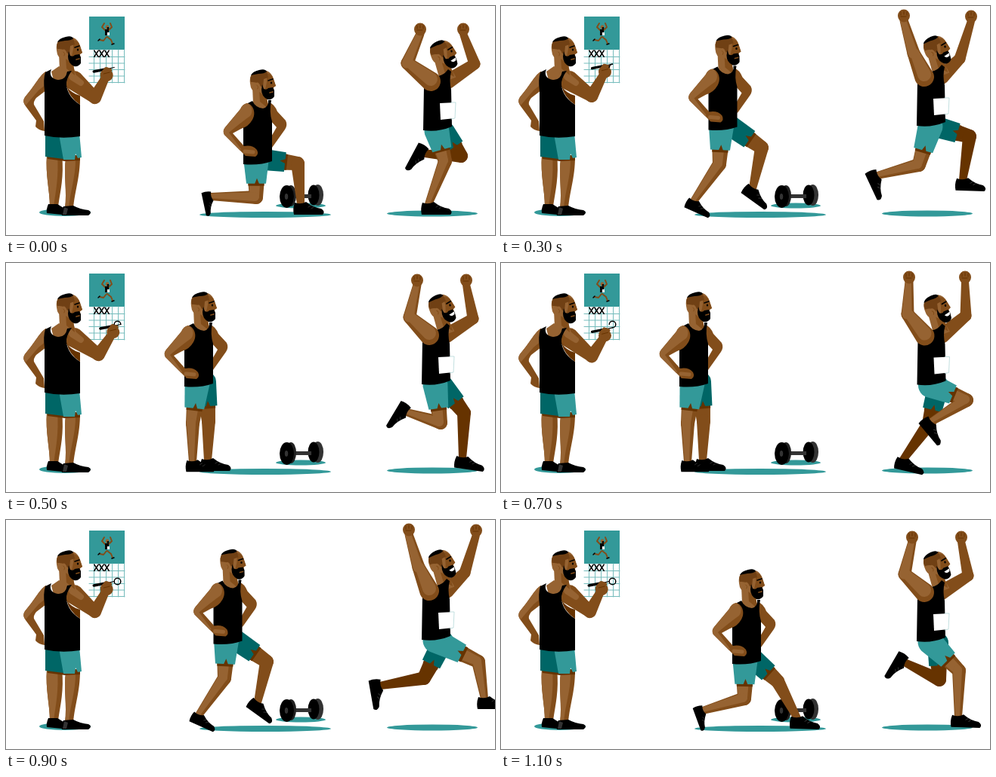
An HTML page with a canvas that plays this animation: 647x304 px, repeating every 1.2 s.

```html
<!DOCTYPE html>
<html lang="en">
<head>
<meta charset="utf-8">
<title>Training plan</title>
<style>
  html, body { margin: 0; width: 100%; height: 100%; overflow: hidden; background: #fff; }
  canvas { display: block; width: 647px; height: 304px; }
</style>
</head>
<body>
<canvas id="stage" width="647" height="304"></canvas>
<script>
const ctx = document.getElementById('stage').getContext('2d');
const LIGHT = '#966332', SKIN = '#824d1a', DEEP = '#663300';
const TEAL = '#339999', DARK_TEAL = '#006666', BLACK = '#000';
const STEP = 100, STEPS = 12;

function fill(color, d) {
  ctx.fillStyle = color;
  ctx.fill(new Path2D(d));
}

function line(color, width, d) {
  ctx.strokeStyle = color;
  ctx.lineWidth = width;
  ctx.lineCap = ctx.lineJoin = 'round';
  ctx.stroke(new Path2D(d));
}

function oval(color, x, y, rx, ry = rx, turn = 0) {
  ctx.fillStyle = color;
  ctx.beginPath();
  ctx.ellipse(x, y, rx, ry, turn, 0, 7);
  ctx.fill();
}

function placed(x, y, deg, size, draw) {
  ctx.save();
  ctx.translate(x, y);
  ctx.rotate(deg * Math.PI / 180);
  ctx.scale(size, size);
  draw();
  ctx.restore();
}

// Tapered segment, round at the start and optionally at the end.
function limb(color, x1, y1, x2, y2, r1, r2, round = true) {
  const a = Math.atan2(y2 - y1, x2 - x1);
  const nx = -Math.sin(a), ny = Math.cos(a);
  ctx.fillStyle = color;
  ctx.beginPath();
  ctx.moveTo(x1 + nx * r1, y1 + ny * r1);
  ctx.arc(x1, y1, r1, a + Math.PI / 2, a + Math.PI * 1.5);
  ctx.lineTo(x2 - nx * r2, y2 - ny * r2);
  if (round) ctx.arc(x2, y2, r2, a - Math.PI / 2, a + Math.PI / 2);
  else ctx.lineTo(x2 + nx * r2, y2 + ny * r2);
  ctx.fill();
}

// Pose at step s; every key is [step, ...values].
function at(keys, s) {
  let i = keys.length - 1;
  while (keys[i][0] > s) i--;
  const a = keys[i], b = keys[i + 1] || a;
  const u = (s - a[0]) / (b[0] - a[0] || 1);
  return a.slice(1).map((v, j) => v + (b[j + 1] - v) * u);
}

function head(x, y, deg, smile) {
  placed(x, y, deg, 1, () => {
    fill(LIGHT, 'M-9 18L-8 40L0 50L14 48L8 28Z');
    fill(SKIN, 'M0 22L1 38L12 47L10 30Z');
    fill(LIGHT, 'M-10 2L10 -3Q17 0 19 8L22 17L19 19L20 30L12 34L0 25Q-11 27 -12 14Q-13 7 -10 2Z');
    fill(SKIN, 'M10 0Q17 1 19 8L22 17L19 19L18 23L8 22L10 12Z');
    fill('#704014', 'M-10 2L10 -2L12 6L6 8L5 18L2 18Q-1 11 -11 12Q-13 7 -10 2Z');
    oval(LIGHT, -2, 18, 3.5, 5.5, -.2);
    line(SKIN, 1, 'M-3 16Q0 18 -2 21');
    fill(BLACK, 'M4 15L6 21Q10 23 12 20L18 19L20 23L20 31Q17 36 11 35Q3 31 3 22Z');
    if (smile) fill('#fff', 'M12 25L20 22L19 26Q15 29 12 25Z');
    else line(SKIN, 1.8, 'M14 26L18 25');
    line(BLACK, 1.6, 'M12 10L18 8');
    oval(BLACK, 16, 13, 1.2, 1.5);
    fill(BLACK, 'M-11 3Q-9 -2 0 -4Q8 -6 10 -2Q7 1 -1 1Q-7 2 -11 3Z');
  });
}

function shoe(x, y, deg, size = 1) {
  placed(x, y, deg, size, () => {
    fill(BLACK, 'M-8 -2Q-11 6 -9 14L29 14Q33 10 27 6Q17 5 7 -3Q0 1 -8 -2Z');
    line('#333', 1, 'M10 4L13 2M14 6L17 4');
  });
}

function leg(hx, hy, [kx, ky, ax, ay, deg, size], skin, cloth, lit) {
  limb(skin, hx, hy, kx, ky, 13, 9);
  limb(skin, kx, ky, ax, ay, 9, 5);
  if (lit) {
    limb(LIGHT, hx - 3, hy, kx - 2, ky - 1, 10, 6);
    limb(LIGHT, kx - 2, ky - 1, ax - 1, ay - 1, 6, 3);
  }
  shoe(ax, ay, deg, size);
  const ex = hx + (kx - hx) * .62, ey = hy + (ky - hy) * .62;
  limb(DEEP, hx, hy, ex + (kx - hx) * .06, ey + (ky - hy) * .06, 12, 10.5, false);
  limb(cloth, hx, hy, ex, ey, lit ? 16.5 : 14, 13, false);
  const deg2 = Math.atan2(ky - hy, kx - hx) * 180 / Math.PI;
  placed(ex, ey, deg2, 1, () => fill(DEEP, 'M.5 -4L-7 -1L.5 2Z'));
}

function calendar() {
  ctx.fillStyle = TEAL;
  ctx.fillRect(110, 14, 47, 44);
  let d = '';
  for (let i = 0; i < 6; i++) d += `M${116.5 + i * 8} 58V102`;
  for (let i = 0; i < 5; i++) d += `M110 ${67.5 + i * 8.5}H157`;
  line('#75bcbc', 1, d);
  line(SKIN, 2, 'M131 32L127 28L130 23M136 32L140 28L138 23M133 41L129 46L124 45M134 41L139 45L141 50');
  oval(LIGHT, 134, 28, 2.2, 2.8);
  oval(BLACK, 135, 29.5, 1.4);
  fill(BLACK, 'M131 31L136 31L136 39L131 39Z');
  fill('#fff', 'M134 35L137 35L137 39L134 39Z');
  line(BLACK, 1.5, 'M122 46L124 44M140 51L143 50');
  for (const x of [119.5, 126.5, 133.5])
    line(BLACK, 1.4, `M${x - 2.8} 59L${x + 2.8} 67.5M${x + 2.8} 59L${x - 2.8} 67.5`);
}

function writer(s) {
  const turn = Math.min(Math.max(s - 1, 0), 8) / 8 * Math.PI * 2;
  const a = Math.PI + turn;
  const tx = 147.5 + 4.3 * Math.cos(a), ty = 81.5 + 4.3 * Math.sin(a);
  const hx = tx - 10, hy = ty + 10.5;
  const ex = 117.5 + (tx - 143) * .55, ey = 122 + (ty - 82) * .5;

  oval(TEAL, 78, 274, 34, 5);
  calendar();

  fill(SKIN, 'M54 198L74 198C77 226 72 245 69 266L58 266C58 245 52 225 54 198Z');
  fill(LIGHT, 'M54 198L68 198C70 226 66 245 63 266L58 266C58 245 52 225 54 198Z');
  fill(SKIN, 'M79 200L98 200C98 228 91 245 89 269L78 269C81 245 76 225 79 200Z');
  fill(LIGHT, 'M79 206L92 204C92 228 85 245 83 269L78 269C81 245 76 225 79 206Z');
  fill(BLACK, 'M56 263Q53 270 54 275L74 277L76 268L68 263Z');
  fill(BLACK, 'M76 266Q72 273 74 278L109 278Q115 274 109 271Q98 270 89 265Z');
  fill('#333', 'M77 267L82 269L80 277L75 277Z');
  fill(DEEP, 'M54 198H98V205L78 206L55 203Z');
  fill(DARK_TEAL, 'M52 168L52 200L76 203L78 168Z');
  fill(TEAL, 'M70 170L76 204L91 204L92 196L95 202L100 201L97 168Z');

  fill(SKIN, 'M53 87C45 91 39 105 25 121Q21 127 26 133L40 152L39 160Q43 165 51 166L50 153L37 131Q36 127 40 122L53 112Z');
  fill(LIGHT, 'M53 87C45 91 39 105 25 121Q21 127 26 132L43 112L53 104Z');
  limb(SKIN, 90, 99, ex, ey, 13, 8);
  limb(SKIN, ex, ey, hx, hy, 8.5, 5);
  limb(LIGHT, 88, 94, 99, 102, 5, 4);
  head(79, 45, 0);
  fill(LIGHT, 'M60 87L70 80L86 88L76 102L63 99Z');
  fill(BLACK, 'M52 88L60 84C56 93 63 98 70 98Q79 98 81 87L87 86Q79 97 80 105Q82 121 98 131L98 173Q73 177 51 172L51 112Q49 98 52 88Z');
  fill(DEEP, 'M80 106Q84 122 98 131L98 119Q86 116 80 106Z');

  line(BLACK, 3.4, `M${tx - 27} ${ty + 5.5}L${tx - 9} ${ty + 2}`);
  line(BLACK, 1.2, `M${tx - 9} ${ty + 2}L${tx} ${ty}`);
  oval(SKIN, hx, hy, 8.5, 8);
  line(SKIN, 4, `M${hx - 6} ${hy - 3}L${hx - 1} ${hy - 9}L${hx + 5} ${hy - 7}`);
  line(DEEP, 1, `M${hx - 4} ${hy - 2}L${hx + 4} ${hy - 4}`);
  if (turn > 0) {
    ctx.strokeStyle = BLACK;
    ctx.lineWidth = 1.5;
    ctx.beginPath();
    ctx.arc(147.5, 81.5, 4.3, Math.PI, a);
    ctx.stroke();
  }
}

function dumbbell() {
  oval(TEAL, 390, 265, 33, 3.5);
  ctx.fillStyle = '#333';
  ctx.fillRect(378, 250, 28, 5);
  oval('#222', 377, 252, 7, 14);
  oval(BLACK, 371.5, 253, 9.5, 15);
  oval('#333', 371, 253, 2.2, 4);
  oval('#333', 412.5, 251, 7.5, 14);
  oval(BLACK, 407, 251, 7.5, 13.5);
  ctx.fillStyle = '#333';
  ctx.fillRect(384, 250, 20, 5);
}

// Lunge keys: body x, y; legs: knee, ankle, shoe angle, shoe size.
const lungeBody = [[0, 335, 89], [1, 327, 70], [3, 295.5, 43.5], [5, 257, 43]];
const lungeNear = [
  [0, 331, 254, 271, 253, 78, .8], [1, 322, 237, 267, 253, 70, .82],
  [3, 289, 210, 255, 259, 24, .9], [5, 247, 213, 247, 264, 0, .95]
];
const lungeFar = [
  [0, 386, 209, 390, 263, 0], [1, 366, 214, 392, 263, 2],
  [3, 345, 188, 333, 242, 36], [5, 268, 210, 267, 262, 0]
];

function lunger(s) {
  const m = s <= 6 ? s : 12 - s;
  const [x, y] = at(lungeBody, m);
  oval(TEAL, 343, 277, 87, 4);
  dumbbell();
  placed(x, y, 0, 1, () =>
    fill(SKIN, 'M13 39Q20 41 24 51L35 63Q38 69 34 75L17 99L15 86L23 72L14 62Z'));
  leg(x + 7, y + 115, at(lungeFar, m), SKIN, DARK_TEAL, false);
  leg(x - 4, y + 117, at(lungeNear, m), SKIN, TEAL, true);
  head(x, y, 0);
  placed(x, y, 0, 1, () => {
    fill(BLACK, 'M-15 40L-9 37Q-5 46 5 47Q13 45 12 36L16 36Q13 52 17 64L17 117Q0 123 -21 121L-21 66Z');
    fill(SKIN, 'M-16 40C-7 42 -4 54 -9 62Q-14 71 -24 74L-35 80L-20 97Q-9 95 -3 102Q0 108 -5 111L-18 110L-25 103L-46 82Q-49 77 -45 72L-25 48Q-22 41 -16 40Z');
    fill(LIGHT, 'M-16 40C-10 42 -7 51 -12 57Q-22 64 -40 79L-24 101L-25 103L-46 82Q-49 77 -45 72L-25 48Q-22 41 -16 40Z');
    line(LIGHT, 5, 'M-19 104L-8 105');
  });
}

// Running legs: knee, ankle, shoe angle.
const runNear = [
  [0, 581, 206, 559, 263, 0], [1, 559, 210, 514, 259, 18],
  [3, 553, 211, 498, 225, 65], [5, 575, 212, 530, 198, 121],
  [6, 602, 199, 554, 195, 118], [7, 616, 182, 569, 211, 50],
  [9, 625, 188, 633, 237, 0], [11, 606, 200, 605, 261, 2]
];
const runFar = [
  [0, 602, 199, 554, 196, 118], [1, 617, 181, 573, 210, 40],
  [3, 620, 173, 611, 231, 2], [5, 606, 199, 604, 259, 8],
  [6, 588, 206, 562, 263, 0], [7, 566, 214, 532, 261, 13],
  [9, 553, 210, 495, 220, 80], [11, 580, 212, 534, 189, 120]
];
// Body x, y, near elbow and fist, far elbow and fist.
const runArms = [
  [0, 571, 51, 531, 76, 548, 31, 620, 77, 605, 31],
  [1, 569.5, 47.5, 538, 68, 540, 19, 615, 70, 614, 19],
  [3, 569, 45, 546, 63, 533, 13, 607, 70, 622, 14],
  [5, 569, 47, 534, 72, 544, 23, 618, 74, 609, 23]
];

function fist(x, y, color) {
  oval(color, x, y, 8, 8.5);
  line(DEEP, 1, `M${x - 4} ${y - 5}V${y - 1}M${x} ${y - 6}V${y - 2}M${x + 4} ${y - 5}V${y - 1}M${x - 4} ${y + 1}H${x + 3}`);
}

function runner(s) {
  const [x, y, ex, ey, fx, fy, ex2, ey2, fx2, fy2] = at(runArms, s % 6);
  oval(TEAL, 564, 275.5, 60, 4);
  limb(SKIN, x + 14, y + 49, ex2, ey2, 10, 7.5);
  limb(SKIN, ex2, ey2, fx2, fy2 + 6, 7.5, 5);
  fist(fx2, fy2, SKIN);
  leg(x + 9, y + 116, at(runFar, s), DEEP, DARK_TEAL, false);
  leg(x - 1, y + 115, at(runNear, s), SKIN, TEAL, true);
  head(x, y, -13, true);
  placed(x, y, 0, 1, () => {
    fill(BLACK, 'M-9 37Q3 48 14 33L18 36Q15 48 18 60L19 109Q0 117 -19 114L-18 56Z');
    fill('#fff', 'M3 78L24 77L23 98L4 100Z');
    line('#a9d3d3', .7, 'M18 77L24 77L23 98L18 99');
  });
  limb(SKIN, x - 9, y + 49, ex, ey, 13, 8.5);
  limb(SKIN, ex, ey, fx, fy + 6, 8.5, 5.5);
  limb(LIGHT, x - 9, y + 46, ex + 1, ey - 1, 9, 6);
  limb(LIGHT, ex - 1, ey, fx - 1, fy + 6, 6.5, 4);
  fist(fx, fy, SKIN);
}

function frame() {
  const s = Math.floor(performance.now() / STEP) % STEPS;
  ctx.fillStyle = '#fff';
  ctx.fillRect(0, 0, 647, 304);
  writer(s);
  lunger(s);
  runner(s);
  requestAnimationFrame(frame);
}
frame();
</script>
</body>
</html>
```
